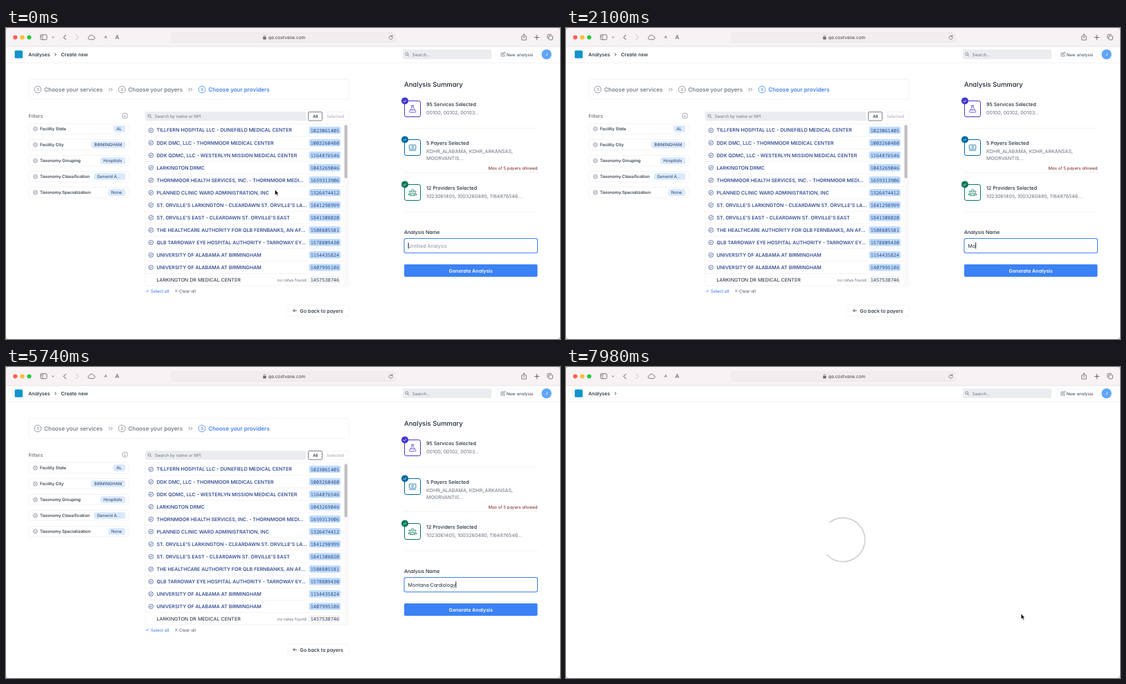
Recreate the animation shown at these times as an HTML page. Size 800 by 450 pixels, loop 8 s.

```html
<!DOCTYPE html>
<html lang="en">
<head>
<meta charset="utf-8">
<title>Create analysis</title>
<style>
html, body { margin: 0; width: 100%; height: 100%; overflow: hidden; background: #d9d7d8; }
svg { display: block; width: 800px; height: 450px; }
text {
  font-family: Inter, "Open Sans", sans-serif;
  font-feature-settings: "cv11";
  text-rendering: geometricPrecision;
  white-space: pre;
}
text.mono { font-family: "Noto Sans Mono", "Liberation Mono", monospace; }
</style>
</head>
<body>
<svg id="stage" viewBox="0 0 800 450"></svg>
<script>
const SM = 7.1, XS = 6.1, MD = 8.13, LG = 9.45;
const INK = '#1f2937', GRAY = '#6b7280', LINE = '#ecedf0', NAVY = '#1e3a8a', BLUE = '#2f72ea';
const LOOP = 8000, STEP = 70, SWITCH = 7630;

// Text is placed by the vertical centre of its capitals.
const txt = (x, y, s, size, fill = INK, weight = 400, more = '') =>
  `<text x="${x}" y="${(y + size * 0.364).toFixed(2)}" font-size="${size}" fill="${fill}" font-weight="${weight}" ${more}>${s}</text>`;
const mid = 'text-anchor="middle"', end = 'text-anchor="end"';
const box = (x, y, w, h, r, fill, stroke = 'none', sw = 0.6) =>
  `<rect x="${x}" y="${y}" width="${w}" height="${h}" rx="${r}" fill="${fill}" stroke="${stroke}" stroke-width="${sw}"/>`;
const dot = (x, y, r, fill, stroke = 'none', sw = 0.7) =>
  `<circle cx="${x}" cy="${y}" r="${r}" fill="${fill}" stroke="${stroke}" stroke-width="${sw}"/>`;
const path = (d, stroke, sw = 0.8, fill = 'none') =>
  `<path d="${d}" stroke="${stroke}" stroke-width="${sw}" fill="${fill}" stroke-linecap="round" stroke-linejoin="round"/>`;
const rule = (x, y, w, c = LINE) => path(`M${x} ${y}h${w}`, c, 0.6);
const lens = (x, y, c) => dot(x, y, 2, 'none', c) + path(`M${x + 1.5} ${y + 1.5}l1.6 1.6`, c, 0.7);
const tick = (x, y, c, k = 1) => path(`M${x - 1.5 * k} ${y}l${1.1 * k} ${1.2 * k}l${1.9 * k} ${-2.4 * k}`, c, 0.75);
const chev = (x, y, c, r = 1.6, sw = 0.9) => path(`M${x - r / 2} ${y - r}l${r} ${r}l${-r} ${r}`, c, sw);

function toolbar() {
  const c = '#5f5a5c', y = 13.5;
  return box(0, 0, 800, 450, 5, '#fff') +
    `<path d="M0 27V5a5 5 0 0 1 5-5H795a5 5 0 0 1 5 5V27z" fill="#f7f2f3"/>` + rule(0, 27, 800, '#ded9da') +
    dot(13.3, y, 3.1, '#ff5f57') + dot(23.4, y, 3.1, '#febc2e') + dot(33.5, y, 3.1, '#28c840') +
    box(49.8, 9.8, 9.2, 7, 1.2, 'none', c, 0.8) + path('M53 10v6.6M51 11.6h.8M51 13h.8', c, 0.6) +
    path('M66.6 12.8l1.4 1.4l1.4-1.4', c, 0.8) +
    path('M86.4 10.2l-3.2 3.3l3.2 3.3', '#4b4749', 1) + path('M101.4 10.2l3.2 3.3l-3.2 3.3', '#bfbabc', 1) +
    path('M120.4 16.6a2.2 2.2 0 0 1 .1-4.3a3 3 0 0 1 5.6-.6a2.5 2.5 0 0 1 .4 4.9z', c, 0.8) +
    txt(144, y, 'A', 5.4, c, 500, mid) + txt(160.7, 13.2, 'A', 8, c, 500, mid) +
    box(238.5, 7, 323.5, 13.5, 2.5, '#f2edee', '#e5dfe1') +
    box(371.2, 13, 4.4, 3.6, 0.6, '#6b6769') + path('M372.2 13v-1.2a1.2 1.2 0 0 1 2.4 0V13', '#6b6769', 0.7) +
    txt(378.8, 13.8, 'qa.costvane.com', 6.5, '#3f3b3d') +
    path('M557.8 12.2a2.6 2.6 0 1 0 .5 2M558 10.4v2h-2', c, 0.7) +
    path('M746.3 11.9h-1.6v5.4h6.6v-5.4h-1.6M748 14.6V8.8M746.4 10.4l1.6-1.6l1.6 1.6', c, 0.75) +
    path('M766.6 10.2v6.6M763.3 13.5h6.6', c, 0.9) +
    box(783.8, 11.4, 5.6, 5.6, 1, 'none', c, 0.8) + path('M782 15v-4.6a1 1 0 0 1 1-1h4.4', c, 0.8);
}

function nav() {
  return rule(0, 50.5, 800, '#ececef') + box(12.6, 32.4, 11.4, 11.4, 1.6, '#1193cd') +
    txt(32.2, 38.3, 'Analyses', SM, INK, 500) + chev(71.5, 38.3, INK) +
    box(573, 31.3, 128, 13.8, 1.8, '#ebecf0') + lens(578.8, 37.6, GRAY) + txt(586.8, 38.3, 'Search...', XS, GRAY) +
    box(709.5, 31.6, 56.5, 13.2, 2, '#fff', '#f0f0f3') +
    path('M718 36h-3v5h5v-2.4M717 38.8l.3-1.3l3-3l1 1l-3 3z', '#4b5563', 0.6) +
    txt(722.7, 38.3, 'New analysis', XS, '#374151') +
    dot(780.6, 38.2, 7.2, '#60a5fa') + txt(780.6, 38.2, 'J', 5.6, '#fff', 500, mid);
}

function steps() {
  const item = (n, x, label, c) => dot(x, 89, 4.9, 'none', c) + txt(x, 89, n, 5.6, c, 500, mid) +
    txt(x + 9.2, 89.2, label, MD, c, 500);
  const gap = x => chev(x - 1.4, 89, GRAY, 2, 0.8) + chev(x + 1.6, 89, GRAY, 2, 0.8);
  return box(33, 74.5, 462, 29, 2.5, '#fff', LINE) +
    item(1, 45.9, 'Choose your services', GRAY) + gap(151) +
    item(2, 167.4, 'Choose your payers', GRAY) + gap(266.2) +
    item(3, 283, 'Choose your providers', BLUE);
}

function filters() {
  const rows = [['Facility State', 'AL', 17], ['Facility City', 'BIRMINGHAM', 49], ['Taxonomy Grouping', 'Hospitals', 36],
    ['Taxonomy Classification', 'General A...', 45], ['Taxonomy Specialization', 'None', 24.5]];
  return txt(32.5, 127.7, 'Filters', SM, GRAY, 500) +
    dot(171.8, 126.8, 3.8, 'none', GRAY, 0.6) + path('M171.8 126.6v2M171.8 124.9v.1', GRAY, 0.7) +
    rows.map(([name, value, w], i) => {
      const y = 146 + 23 * i;
      return box(33, y - 7.5, 144.5, 15, 2.5, '#fff', LINE) +
        dot(42.4, y, 2.8, 'none', '#4b5563', 0.6) + path(`M41.3 ${y - 0.4}l1.1 1.1l1.1-1.1`, '#4b5563', 0.7) +
        txt(49, y + 0.1, name, XS, INK, 500) +
        box(172.3 - w, y - 5, w, 10, 3.2, '#dbeafe') + txt(176.5 - w, y + 0.1, value, XS, '#243b6b');
    }).join('');
}

const providers = [
  ['TILLFERN HOSPITAL LLC - DUNEFIELD MEDICAL CENTER', 1023061405],
  ['DDK DMC, LLC - THORNMOOR MEDICAL CENTER', 1003260480],
  ['DDK QDMC, LLC - WESTERLYN MISSION MEDICAL CENTER', 1164876546],
  ['LARKINGTON DRMC', 1043269046],
  ['THORNMOOR HEALTH SERVICES, INC. - THORNMOOR MEDI...', 1659313906],
  ['PLANNED CLINIC WARD ADMINISTRATION, INC', 1326474412],
  ["ST. ORVILLE'S LARKINGTON - CLEARDAWN ST. ORVILLE'S LA...", 1841298999],
  ["ST. ORVILLE'S EAST - CLEARDAWN ST. ORVILLE'S EAST", 1841308020],
  ['THE HEALTHCARE AUTHORITY FOR QLB FERNBANKS, AN AF...', 1508805581],
  ['QLB TARROWAY EYE HOSPITAL AUTHORITY - TARROWAY EY...', 1578809430],
  ['UNIVERSITY OF ALABAMA AT BIRMINGHAM', 1154435824],
  ['UNIVERSITY OF ALABAMA AT BIRMINGHAM', 1407995186],
  ['LARKINGTON DR MEDICAL CENTER', 1457538746]
];

function list() {
  const rows = providers.map(([name, id], i) => {
    const y = 147.9 + 18.04 * i, on = i < 12;
    return (on ? rule(201.5, y + 9, 286) + dot(209.4, y + 0.2, 3.2, 'none', NAVY, 0.65) + tick(209.2, y + 0.3, NAVY, 0.9)
      : txt(433.8, y + 0.2, 'no rates found', XS, GRAY, 400, end)) +
      txt(217.5, y, name, SM, on ? NAVY : INK, on ? 500 : 400) +
      box(437.6, y - 5.2, 45.6, 10.4, 2.4, on ? '#bfdbfe' : '#f3f4f6') +
      txt(460.4, y + 0.1, id, 6.9, on ? '#28477f' : '#374151', 400, 'class="mono" ' + mid);
  }).join('');
  return box(201, 121.3, 232.5, 13, 1.8, '#ebecf0') + lens(207, 127, GRAY) +
    txt(214.8, 127.9, 'Search by name or NPI', XS, GRAY) +
    box(457, 121.5, 38, 12.5, 2, '#fff', LINE) + box(436.5, 121.5, 20, 12.5, 1.4, '#fff', GRAY, 0.9) +
    txt(446.9, 127.7, 'All', XS, INK, 500, mid) + txt(475.7, 127.7, 'Selected', XS, '#9ca3af', 400, mid) +
    box(201, 138.6, 294, 234.4, 2, '#fff', LINE) + rows +
    box(487.5, 139, 7, 233.6, 0, '#fafafa') + box(488.7, 140.2, 4.3, 77.4, 2.1, '#c1c1c3') +
    tick(204, 380.5, BLUE, 1.1) + txt(209, 380.5, 'Select all', XS, BLUE) +
    path('M244.6 379.2l2.6 2.6M247.2 379.2l-2.6 2.6', '#4b5563', 0.7) + txt(250, 380.5, 'Clear all', XS, '#4b5563') +
    box(407, 401, 88, 16, 2.5, '#fff', '#eeeef1') + path('M419.4 409h-4.6M416.6 407.2l-1.8 1.8l1.8 1.8', INK, 0.8) +
    txt(424.6, 409.1, 'Go back to payers', SM, INK, 500);
}

function summary() {
  const flask = c => path('M585.6 112.4h3M586 112.4v3.2l-3.6 5a.9.9 0 0 0 .8 1.4h7.8a.9.9 0 0 0 .8-1.4l-3.6-5v-3.2M584.2 118.6h5.8', c, 0.8);
  const note = c => box(582.3, 169.2, 9.6, 6.2, 0.8, 'none', c, 0.8) + dot(587.1, 172.3, 1.4, 'none', c, 0.7) +
    path('M582.6 177.4h9.2', c, 0.7);
  const team = c => dot(587, 235.4, 1.7, 'none', c, 0.8) + dot(583.2, 236.8, 1.2, 'none', c) + dot(590.8, 236.8, 1.2, 'none', c) +
    path('M584 242a3 3 0 0 1 6 0zM583.8 239.6a2 2 0 0 0-2.9 1.8h2.6M590.2 239.6a2 2 0 0 1 2.9 1.8h-2.6', c, 0.8);
  const card = (y, c, icon, title, ...lines) =>
    box(575.5, y + 0.5, 23, 23, 2.6, '#fff', c, 1) + icon(c) + dot(576, y + 0.4, 5, c) + tick(575.8, y + 0.7, '#fff', 1.2) +
    txt(607, y + 5.6, title, SM, INK, 500) +
    lines.map((s, i) => txt(607, y + 17.4 + 10 * i, s, SM, GRAY)).join('');
  return txt(575, 81.4, 'Analysis Summary', LG, INK, 500) +
    card(105, '#4338ca', flask, '95 Services Selected', '00100, 00102, 00103...') + rule(575, 145, 193) +
    card(161, '#0369a1', note, '5 Payers Selected', 'KDHR_ALABAMA, KDHR_ARKANSAS,', 'MOORVANTIS...') +
    txt(767.6, 203.2, 'Max of 5 payers allowed', XS, '#7f1d1d', 400, end) + rule(575, 209.5, 193) +
    card(226, '#047857', team, '12 Providers Selected', '1023061405, 1003260480, 1164876546...') + rule(575, 266, 193) +
    txt(575, 295.6, 'Analysis Name', SM, INK, 500) +
    box(575, 304.5, 192.5, 21, 2.8, '#fff', '#3f7fee', 1.05) +
    txt(580.6, 315, 'Untitled Analysis', SM, '#8a919d', 400, 'id="hint"') + txt(580.6, 315, '', SM, INK, 400, 'id="name"') +
    `<rect id="caret" y="310.4" width="0.9" height="9" fill="#111"/>` +
    `<rect id="button" x="575" y="342" width="192.5" height="18" rx="1.8"/>` +
    txt(671.2, 351, 'Generate Analysis', SM, '#fff', 600, mid);
}

const arrow = '<path d="M0 0V7.6L1.8 6.1L3 8.8L4.3 8.2L3.1 5.6H5.4Z" fill="#000" stroke="#fff" stroke-width=".5"/>';
const hand = '<path d="M-.8 .6a.8 .8 0 0 1 1.6 0V3.2L3.4 3.8Q4.4 4.1 4.2 5.2L3.6 8.4H-.6L-2.8 5.4Q-3 4.3-1.8 4.6L-.8 5.4Z" fill="#fff" stroke="#000" stroke-width=".75" stroke-linejoin="round"/>';

const stage = document.getElementById('stage');
stage.innerHTML = toolbar() + nav() +
  `<g id="page">${txt(79.4, 38.3, 'Create new', SM, INK, 500)}${steps()}${filters()}${list()}${summary()}</g>` +
  `<g id="spinner">${path('M381.2 224.5A31.7 31.7 0 1 1 377.2 272', '#d1d3d8', 1.8)}</g>` +
  `<g id="cursor"><g id="arrow">${arrow}</g><g id="hand">${hand}</g></g>`;
const el = id => document.getElementById(id);
const show = (id, on) => el(id).setAttribute('display', on ? 'inline' : 'none');

const label = 'Montana Cardiology';
const keys = [1890, 2100, 2240, 2380, 2520, 2660, 2800, 3010, 3220, 3360, 3570, 3710, 3920, 4060, 4270, 4480, 4620, 4830];
const blink = [[0, 1], [700, 1], [840, 0], [1120, 0], [1260, 1], [1540, 1], [1680, 0], [1889, 0], [1890, 1],
  [4900, 1], [5040, 0], [5110, 0], [5250, 1], [5880, 1], [6020, 0], [6230, 0], [6370, 1], [7070, 1], [7210, 0], [7350, 0], [7490, 1], [8000, 1]];

function ramp(points, t) {
  const i = points.findIndex(p => p[0] > t);
  const [t0, a] = points[i - 1], [t1, b] = points[i];
  return a + (b - a) * (t - t0) / (t1 - t0);
}
const ease = (t, from, to) => {
  const k = Math.min(1, Math.max(0, (t - from) / (to - from)));
  return k * k * (3 - 2 * k);
};

function draw(now) {
  const t = Math.floor(now % LOOP / STEP) * STEP;
  const loading = t >= SWITCH;
  show('page', !loading);
  show('spinner', loading);
  el('spinner').setAttribute('transform', `rotate(${(t - 7980) * 0.36} 400 250)`);

  const typed = keys.filter(k => k <= t).length;
  const name = el('name');
  name.textContent = label.slice(0, typed);
  show('hint', !typed);
  if (!loading) {
    el('caret').setAttribute('x', 580.6 + (typed ? name.getComputedTextLength() : 0));
    el('caret').setAttribute('opacity', ramp(blink, t));
  }

  const up = ease(t, 0, 840), over = ease(t, 6160, 7070);
  const x = 388.4 - 57.6 * up + 326.4 * over, y = 234 - 95.2 * up + 218.4 * over;
  const hover = !loading && x > 575 && y > 342 && y < 360;
  show('cursor', t < 1890 || t >= 6160);
  show('arrow', !hover);
  show('hand', hover);
  el('cursor').setAttribute('transform', `translate(${x} ${y})`);
  el('button').setAttribute('fill', hover ? '#2563eb' : '#3b82f6');
}

function tickFrame() {
  draw(performance.now());
  requestAnimationFrame(tickFrame);
}
tickFrame();
</script>
</body>
</html>
```
